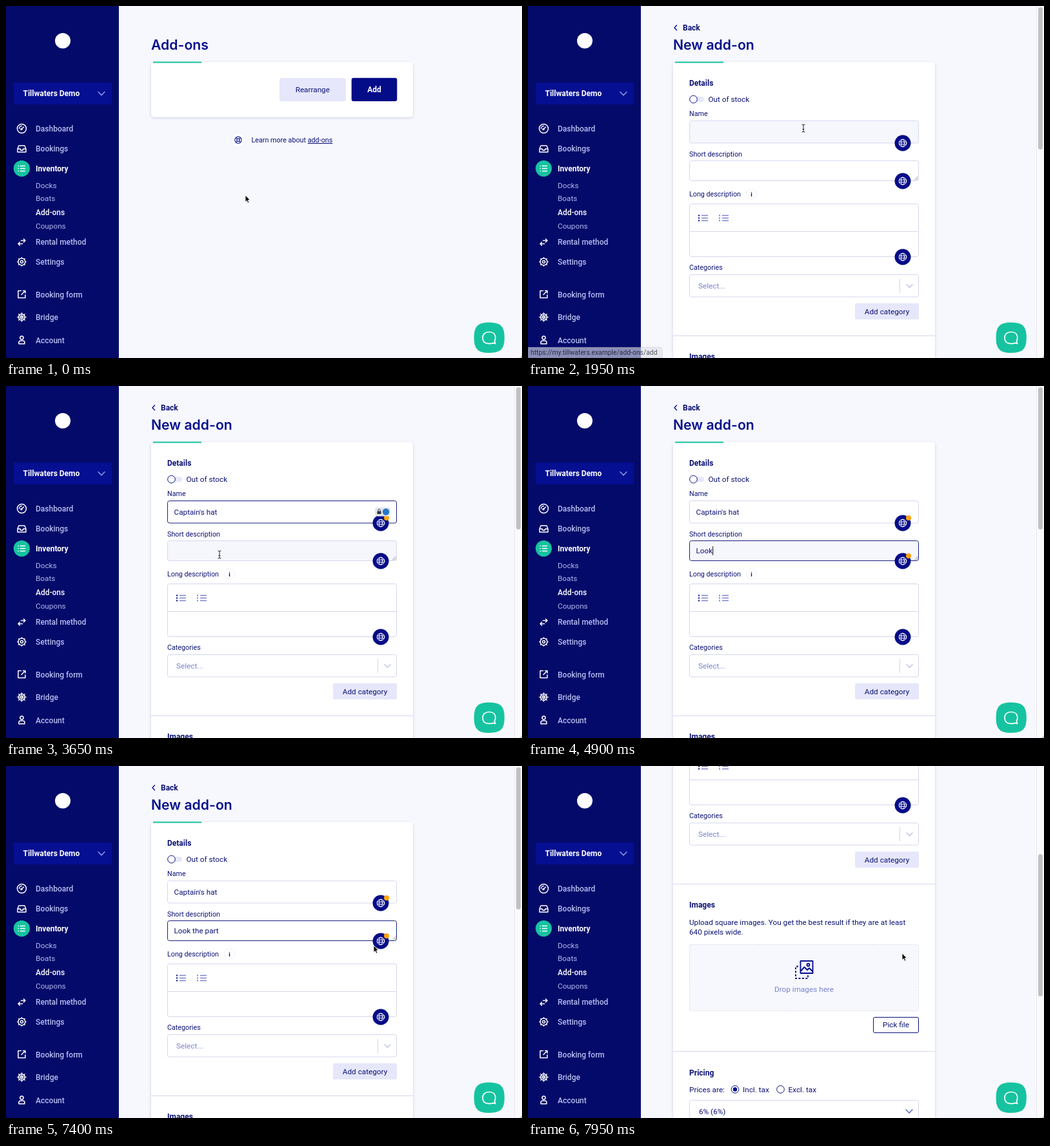
An HTML page that plays this animation: 800 px wide and 547 px high, repeating every 8000 ms.

```html
<!DOCTYPE html>
<html lang="en">
<head>
<meta charset="utf-8">
<title>Add-ons</title>
<style>
html, body { margin: 0; width: 100%; height: 100%; overflow: hidden; background: #f7f8fd; }
svg { display: block; }
text { font-family: Roboto, "Noto Sans", sans-serif; font-size: 11.75px; fill: #0c1275; white-space: pre; }
.h { font-family: Inter, "Open Sans", sans-serif; font-size: 21.2px; font-weight: 600; fill: #07108c; }
.b { font-weight: 700; font-size: 12px; }
.m { font-weight: 500; font-size: 12px; }
.s { font-size: 10.75px; }
.nav { fill: #b7bdf0; }
.sub { fill: #b1b8ee; }
.on { fill: #fff; }
.mid { text-anchor: middle; }
.soft { fill: #7a82cc; }
.line { fill: none; stroke: #d5d7ee; }
.ico { fill: none; stroke: #fff; stroke-width: 1.5; stroke-linecap: round; stroke-linejoin: round; }
.ink { fill: none; stroke: #07108c; stroke-width: 1.4; stroke-linecap: round; stroke-linejoin: round; }
</style>
</head>
<body>
<svg id="stage" width="800" height="547" viewBox="0 0 800 547" xmlns="http://www.w3.org/2000/svg"></svg>
<script>
const LOOP = 8000, NAV = 1500;
const NAVY = '#050c88', TEAL = '#16c3a0', PALE = '#e6e7fb', TINT = '#f6f7fd';

const text = (x, y, s, cls = '', attrs = '') => `<text x="${x}" y="${y}" class="${cls}" ${attrs}>${s}</text>`;
const rect = (x, y, w, h, r, attrs) => `<rect x="${x}" y="${y}" width="${w}" height="${h}" rx="${r}" ${attrs}/>`;
const circle = (x, y, r, attrs = '') => `<circle cx="${x}" cy="${y}" r="${r}" ${attrs}/>`;
const path = (d, attrs = '') => `<path d="${d}" ${attrs}/>`;
const at = (x, y, inner, attrs = '') => `<g transform="translate(${x} ${y})" ${attrs}>${inner}</g>`;
const box = (y, h, attrs = 'fill="#fff"') => rect(250.5, y + .5, 355, h, 3, `stroke="#d5d7ee" ${attrs}`);
const rule = y => path(`M225 ${y}H631`, 'class="line"');

const spokes = (n, a, b) => Array.from({ length: n }, (_, i) => {
  const c = Math.cos(i * 2 * Math.PI / n), s = Math.sin(i * 2 * Math.PI / n);
  return `M${(a * c).toFixed(2)} ${(a * s).toFixed(2)}L${(b * c).toFixed(2)} ${(b * s).toFixed(2)}`;
}).join('');

const globe = y => at(581, y, circle(0, 0, 12.5, `fill="${NAVY}"`) +
  `<g class="ico" style="stroke-width:1">${circle(0, 0, 5.8)}<ellipse rx="2.6" ry="5.8"/>${path('M-5.6 -1.8H5.6M-5.6 1.8H5.6')}</g>`);
const dot = (id, y) => circle(590, y, 4, `id="${id}" fill="#fca510"`);
const chevron = (x, y, color, w = 4.5) =>
  path(`M${x - w} ${y - w / 2}l${w} ${w}l${w} ${-w}`, `fill="none" stroke="${color}" stroke-width="1.6" stroke-linecap="round"`);
const listIcon = (x, bullet) => at(x, 329.5,
  path('M5 -4H15M5 0H15M5 4H15', 'stroke="#7a82cc" stroke-width="1.7"') +
  path('M0 -4H2M0 0H2M0 4H2', `stroke="${bullet}" stroke-width="2"`));
const radio = (x, y, on) => circle(x, y, 5.8, 'fill="#fff" stroke="#07108c"') +
  (on ? circle(x, y, 3.2, 'fill="#07108c"') : '');

function sidebar() {
  const icons = [
    [190.5, circle(0, 0, 7) + path('M-1 1.5L3 -2.5M-4 0A4 4 0 0 1 0 -4') + circle(-.5, 1, 1)],
    [222, path('M-6.5 0L-4.5 -5H4.5L6.5 0V5H-6.5ZM-6.5 0H-2.5Q-2 2.4 0 2.4T2.5 0H6.5')],
    [252.5, path('M-2 -4H5M-2 0H5M-2 4H5M-5.4 -4h.3M-5.4 0h.3M-5.4 4h.3')],
    [367, path('M-1 -2.5H5.5L3 -5M5.5 -2.5L3 0M1 2.5H-5.5L-3 0M-5.5 2.5L-3 5')],
    [397.5, circle(0, 0, 5.4) + circle(0, 0, 2) + path(spokes(8, 5.8, 6.6))],
    [448, path('M-1 -5.5H-5.5V5.5H5.5V1M2 -5.5H5.5V-2M5.5 -5.5L-.5 .5')],
    [483.5, circle(0, 0, 5) + circle(0, 0, 1.5) + path(spokes(8, 2, 7), 'stroke-width="1.2"')],
    [519, circle(0, -3.4, 2.6) + path('M-4.5 6V4Q-4.5 1.2 -2 1.2H2Q4.5 1.2 4.5 4V6Z')]
  ];
  const items = [['Dashboard', 190.5], ['Bookings', 222], ['Inventory', 252.3], ['Rental method', 367],
    ['Settings', 397.7], ['Booking form', 448.3], ['Bridge', 483.5], ['Account', 519.5]];
  const subs = [['Docks', 283], ['Boats', 303.3], ['Add-ons', 324.5], ['Coupons', 345.5]];
  return rect(0, 0, 175, 547, 0, 'fill="#040a69"') +
    circle(88, 54, 12, 'fill="#fff"') +
    rect(12, 119, 152, 34, 2, 'fill="#050f91"') +
    text(26.5, 140, 'Tillwaters Demo', 'b on') + chevron(148, 136, '#8a95e6', 5) +
    circle(24.3, 252.5, 12.6, `fill="${TEAL}"`) +
    icons.map(([y, s]) => at(24.4, y, s, 'class="ico"')).join('') +
    items.map(([s, y]) => text(46, y + 4.2, s, s === 'Inventory' ? 'b on' : 'm nav')).join('') +
    subs.map(([s, y]) => text(46, y, s, s === 'Add-ons' ? 'm on' : 'sub')).join('');
}

const card = h => rect(225, 87, 406, h, 5, 'fill="#fff" filter="url(#shade)"') +
  path('M228 87.5H303', `stroke="${TEAL}" stroke-width="2"`);

const listPage = () => text(225, 68, 'Add-ons', 'h') + card(85.5) +
  rect(424, 112, 103, 36, 3, `fill="${PALE}"`) + text(475.3, 134.3, 'Rearrange', 'mid') +
  rect(535.7, 111.7, 70.6, 36.3, 3, 'id="addBtn"') + text(571, 134.3, 'Add', 'b mid on') +
  circle(360, 208.3, 11, 'fill="#fff" stroke="#eff0f9"') +
  at(360, 208.3, circle(0, 0, 5.2) + circle(0, 0, 2.2) +
    path('M-3.6 -3.6L-1.6 -1.6M3.6 -3.6L1.6 -1.6M-3.6 3.6L-1.6 1.6M3.6 3.6L1.6 1.6'), 'class="ink" style="stroke-width:1.1"') +
  text(380.5, 212, 'Learn more about <tspan text-decoration="underline">add-ons</tspan>', 's');

const formPage = () =>
  path('M230.5 30L227 33.7L230.5 37.4', 'class="ink"') + text(240, 38, 'Back', 'b') +
  text(225, 68, 'New add-on', 'h') + card(1000) +
  text(250, 123.5, 'Details', 'b') +
  rect(256, 141, 17, 8, 4, `fill="${PALE}"`) + circle(256.5, 145, 5.8, 'fill="#fff" stroke="#07108c"') +
  text(279.5, 149.3, 'Out of stock') +
  text(250, 171, 'Name', 's') + box(178, 34.5, 'id="name"') + text(260.5, 200.2, '', '', 'id="nameText"') +
  globe(213) + dot('nameDot', 205) +
  `<g id="vault">${rect(572, 188.5, 24, 14, 4, 'fill="#e3e5ec"')}${rect(575.5, 194.5, 6, 4.6, .8, 'fill="#33363f"')}${path('M576.9 194.5V193a1.6 1.6 0 0 1 3.2 0V194.5', 'fill="none" stroke="#33363f"')}${circle(589, 195.5, 5.2, 'fill="#2478c8"')}</g>` +
  text(250, 233.8, 'Short description', 's') + box(240, 31, 'id="short"') + text(260.5, 260.2, '', '', 'id="shortText"') +
  path('M599 270.5L604.5 265M602 270.5L604.5 268', 'stroke="#777" fill="none" stroke-width=".8"') +
  globe(272) + dot('shortDot', 264) +
  text(250, 296.3, 'Long description', 's') +
  circle(346.5, 292, 8, 'fill="#fff" stroke="#f0f1f9"') + text(346.5, 295.5, 'i', 'b mid', 'style="font-size:9.5px"') +
  box(307, 82) + path('M250.5 350.5H605.5', 'class="line"') + listIcon(264, NAVY) + listIcon(296, '#7a82cc') + globe(390) +
  text(250, 410.3, 'Categories', 's') + box(417, 34.5) + text(264, 439.2, 'Select...', 'soft') +
  path('M576.5 424V446', 'class="line"') + chevron(591.5, 435, '#c3c7ea') +
  rect(507, 462, 99, 25, 2, `fill="${PALE}"`) + text(556.5, 478.5, 'Add category', 'mid') + rule(512.5) +
  text(250, 549.3, 'Images', 'b') +
  text(250, 576, 'Upload square images. You get the best result if they are at least') +
  text(250, 591, '640 pixels wide.') +
  box(606, 103, 'fill="#f7f8fd" stroke-dasharray="2 2"') +
  at(414, 631, path('M8.5 1H27.5V20H8.5ZM8.5 17L14.5 10.5L19 15L22 12L27.5 17.5') + circle(20.5, 7, 2) +
    path('M5 9.5H1V28H20V23', 'stroke-dasharray="3 2.4" stroke-linecap="butt"'), 'class="ink" style="stroke-width:1.9"') +
  text(428, 680, 'Drop images here', 'mid soft') +
  rect(535.5, 719.5, 70, 24, 2.5, 'fill="#fff" stroke="#0c1275"') + text(570.5, 735.3, 'Pick file', 'mid') + rule(772.5) +
  text(250, 809.5, 'Pricing', 'b') + text(250, 836, 'Prices are:') +
  radio(321, 831.5, true) + text(333, 836, 'Incl. tax') + radio(391.5, 831.5) + text(403.5, 836, 'Excl. tax') +
  box(848, 34.5) + text(265, 869.8, '6% (6%)') + chevron(591, 865.5, '#6a72c4', 5);

const pointers = {
  arrow: path('M0 0V10.6L2.4 8.4L4 12.2L5.9 11.4L4.3 7.7H7.5Z', 'fill="#000" stroke="#fff" stroke-width=".9"'),
  hand: path('M-1.5 8V0a1.4 1.4 0 0 1 2.8 0V4.5a1.2 1.2 0 0 1 2.2 .3a1.2 1.2 0 0 1 2 .5a1.1 1.1 0 0 1 1.8 .8V9c0 2-1 2.5-1 4H0c-.5-1.5-2.5-3-3.5-5c-.5-1.4 .8-1.8 2 0Z', 'fill="#fff" stroke="#111" stroke-width=".9"'),
  beam: path('M-2.5 -6Q0 -6 0 -4.5Q0 -6 2.5 -6M0 -5V5M-2.5 6Q0 6 0 4.5Q0 6 2.5 6M-1.5 1.5H1.5', 'fill="none" stroke="#222" stroke-width=".95"')
};

const stage = document.getElementById('stage');
stage.innerHTML =
  `<defs><filter id="shade" x="-10%" y="-10%" width="120%" height="130%"><feDropShadow dx="0" dy="1.5" stdDeviation="2" flood-color="#10187a" flood-opacity=".17"/></filter></defs>` +
  rect(0, 0, 800, 547, 0, 'fill="#f7f8fd"') +
  `<g id="list">${listPage()}</g><g id="form"><g id="scroll">${formPage()}<path id="caret" stroke="#111" fill="none"/></g>` +
  rect(789, 0, 11, 547, 0, 'fill="#fafafa"') + path('M788.5 0V547', 'stroke="#e8e8ee"') +
  rect(791, 2, 7, 221, 3.5, 'id="thumb" fill="#c1c1c3"') + '</g>' + sidebar() +
  `<g id="status">${path('M0 530.5H204Q208 530.5 208 534.5V547H0Z', 'fill="#dfe1e8" stroke="#c3c5cf" opacity=".75"')}` +
  text(4, 542.3, 'https://my.tillwaters.example/add-ons/add', '', 'style="font-size:10.35px;fill:#2f323c"') + '</g>' +
  at(749.2, 515.4, path('M0 -23.6C17.5 -23.6 23.6 -17.5 23.6 0S17.5 23.6 0 23.6S-23.6 17.5 -23.6 0S-17.5 -23.6 0 -23.6Z', `fill="${TEAL}"`)) +
  path('M756 523.6Q752.5 524.8 748.5 524.6C742.5 524.4 739 521 739 515.5S743 506.5 749 506.5S758.8 510 758.8 515.5Q758.8 518.5 757.4 520.5L758.6 524.8Z', 'class="ico" style="stroke-width:1.7"') +
  path('M800 540V547H793Q800 547 800 540Z', 'fill="#c4c6d4"') +
  circle(0, 0, 14.5, 'id="press" fill="#dc4a9f"') +
  `<g id="pointer">${Object.entries(pointers).map(([k, s]) => `<g id="${k}">${s}</g>`).join('')}</g>`;

const el = {};
stage.querySelectorAll('[id]').forEach(n => el[n.id] = n);
const show = (n, on) => n.setAttribute('visibility', on ? 'inherit' : 'hidden');
const clamp = v => Math.max(0, Math.min(1, v));
const ease = v => v * v * (3 - 2 * v);

// time, x, y of the mouse
const route = [[30, 371, 294], [850, 572, 130], [1330, 572, 130], [1900, 427, 190], [3400, 427, 190],
  [3630, 331, 262], [7080, 331, 262], [7390, 570, 279], [7500, 570, 279], [7720, 580, 291]];
const presses = [1090, 2080, 3880];
const nameStr = "Captain's hat", shortStr = 'Look the part';
const nameKeys = [...nameStr].map((_, i) => 2330 + i * 71.5);
const shortKeys = [4450, 4650, 4800, 4880, 5000, 5100, 5250, 5340, 5440, 5550, 5880, 5970, 6040];

function mouseAt(t) {
  let i = 1;
  while (i < route.length - 1 && t > route[i][0]) i++;
  const [t0, x0, y0] = route[i - 1], [t1, x1, y1] = route[i];
  const k = ease(clamp((t - t0) / (t1 - t0)));
  return [x0 + (x1 - x0) * k, y0 + (y1 - y0) * k];
}

function field(id, str, keys, t, hover, from, to, mid) {
  const n = keys.filter(k => k <= t).length, focus = t >= from && t < to;
  const label = el[id + 'Text'];
  label.textContent = str.slice(0, n);
  el[id].setAttribute('fill', hover ? TINT : '#fff');
  el[id].setAttribute('stroke', focus ? '#191f7c' : '#d5d7ee');
  show(el[id + 'Dot'], n > 0);
  if (!focus) return;
  const last = n ? keys[n - 1] : from;
  const x = 261 + (n ? label.getComputedTextLength() : 0);
  el.caret.setAttribute('d', `M${x} ${mid - 7}V${mid + 7}`);
  show(el.caret, Math.floor((t - last) / 450) % 2 === 0);
}

function draw(t) {
  const [x, y] = mouseAt(t), form = t >= NAV;
  const inside = (x0, y0, x1, y1) => x > x0 && x < x1 && y > y0 && y < y1;
  const scroll = 329 * ease(clamp((t - 7470) / 470));
  const onAdd = !form && inside(536, 112, 606, 148);
  const onName = form && inside(250, 178, 606, 213);
  const onShort = form && !scroll && inside(250, 240, 606, 272);

  show(el.list, !form);
  show(el.form, form);
  el.addBtn.setAttribute('fill', onAdd ? '#1b27a3' : NAVY);
  el.scroll.setAttribute('transform', `translate(0 ${-scroll})`);
  el.thumb.setAttribute('y', 2 + scroll * 135 / 329);

  show(el.caret, false);
  field('name', nameStr, nameKeys, t, onName, 2130, 3950, 196);
  field('short', shortStr, shortKeys, t, onShort, 3950, LOOP, 256);
  show(el.vault, form && t >= 2130 && t < 3950);

  el.status.setAttribute('opacity', clamp((t - 800) / 100) * clamp((2200 - t) / 300));

  const kind = onAdd ? 'hand' : onName || onShort ? 'beam' : 'arrow';
  for (const k in pointers) show(el[k], k === kind);
  const typing = (t > 2330 && t < 3420) || (t > 4420 && t < 7080);
  show(el.pointer, !typing);
  el.pointer.setAttribute('transform', `translate(${x} ${y})`);

  const p = presses.find(s => t >= s && t < s + 260);
  const a = p === undefined ? 0 : clamp((t - p) / 60) * clamp((p + 260 - t) / 100);
  el.press.setAttribute('opacity', .72 * a);
  el.press.setAttribute('transform', `translate(${x} ${y}) scale(${.7 + .3 * a})`);
}

function tick() {
  draw(performance.now() % LOOP);
  requestAnimationFrame(tick);
}
tick();
</script>
</body>
</html>
```
